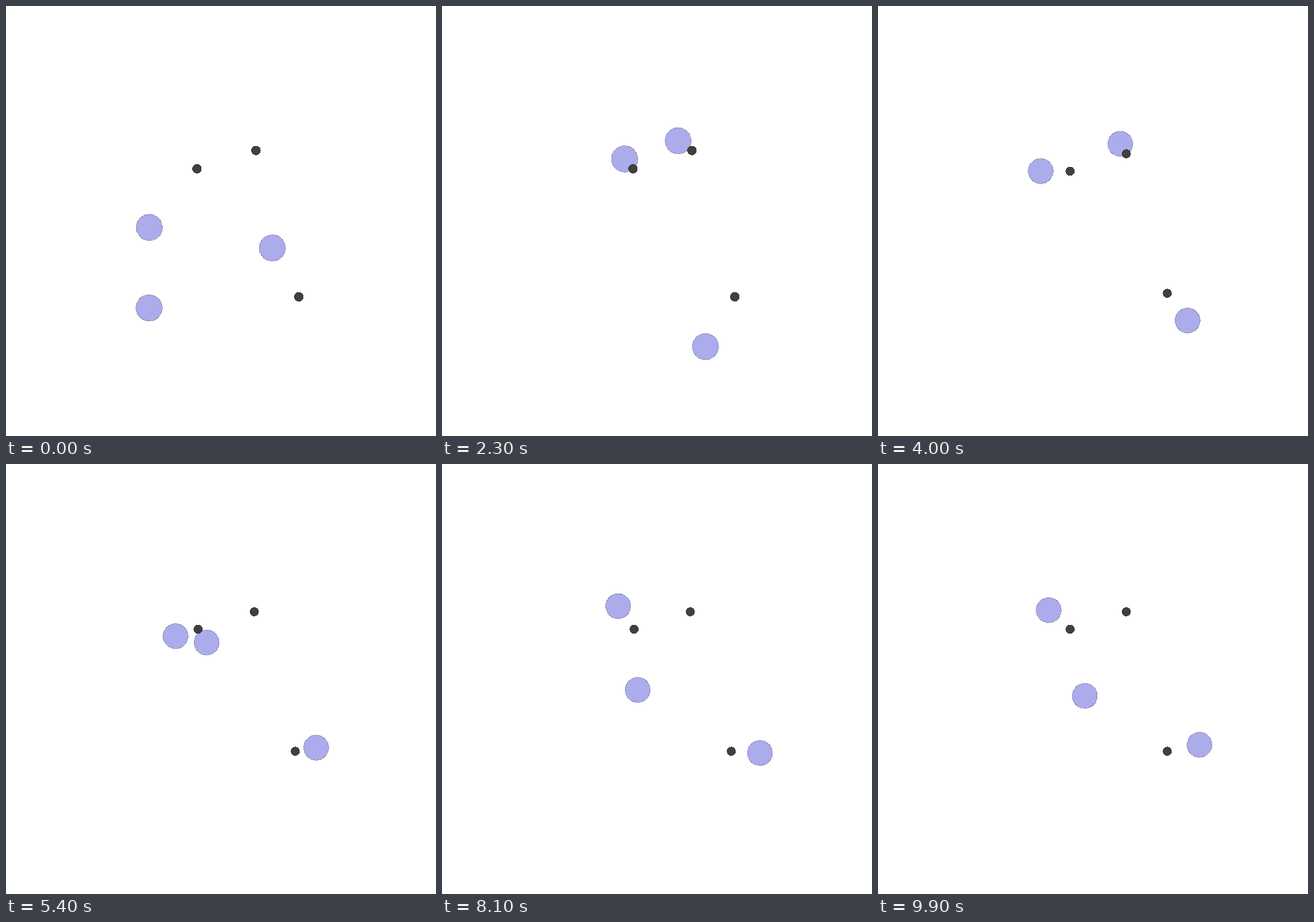
An HTML page for the animation above (10000 ms loop, 700x700 px).

```html
<!DOCTYPE html>
<html lang="en">
<head>
<meta charset="utf-8">
<title>Agents and landmarks</title>
<style>
  html, body { margin: 0; width: 100%; height: 100%; overflow: hidden; background: #fff; }
  svg { display: block; width: 100vw; height: 100vh; }
  circle { shape-rendering: crispEdges; stroke-width: 1; vector-effect: non-scaling-stroke; }
  .agent { fill: #acacec; stroke: #75759f; stroke-dasharray: 2 1; }
  .landmark { fill: #404040; stroke: #383838; }
</style>
</head>
<body>
<svg viewBox="0 0 700 700"><g id="world"></g></svg>
<script>
const LOOP = 10, STEP = 0.1, CENTER = 350;
const ZOOM_TIME = 2.8, ZOOM_OUT = 0.9535;
const AGENT_RADIUS = 21.3, LANDMARK_RADIUS = 7.2;
const world = document.getElementById('world');

// Key moments in seconds, shared by all agents.
const times = [0, 1.1, 2.3, 3.3, 4, 4.8, 5.4, 6.9, 8.1, 9.9];

// Screen position of each agent at those moments.
const paths = [
  { x: [233.4, 290, 297.3, 249, 264.9, 273, 276, 273, 286.7, 277.9],
    y: [360.4, 266, 249, 258, 268.8, 279, 280.2, 267.4, 231.4, 238] },
  { x: [433.5, 441, 384.5, 387, 394.5, 357, 326.6, 335, 318.6, 336.7],
    y: [393.8, 264, 219.4, 220, 224.5, 256, 290.7, 338.8, 367.8, 377.5] },
  { x: [233, 325, 428.8, 470, 504, 544, 504.9, 514, 517.6, 523.3],
    y: [491.5, 521, 554.5, 553.5, 512, 484, 461.8, 464.8, 470.6, 457] }
];

const landmarks = [[310.9, 265], [406.9, 235.2], [476.7, 473.4]];

const zoomAt = t => t < ZOOM_TIME ? 1 : ZOOM_OUT;

function addCircle(className, r) {
  const circle = document.createElementNS('http://www.w3.org/2000/svg', 'circle');
  circle.setAttribute('class', className);
  circle.setAttribute('r', r);
  return world.appendChild(circle);
}

function moveTo(circle, x, y) {
  circle.setAttribute('cx', x);
  circle.setAttribute('cy', y);
}

function slope(values, i) {
  const a = Math.max(i - 1, 0), b = Math.min(i + 1, times.length - 1);
  return (values[b] - values[a]) / (times[b] - times[a]);
}

// Smooth cubic curve through the key values.
function valueAt(values, t) {
  let i = 0;
  while (i < times.length - 2 && t >= times[i + 1]) i++;
  const span = times[i + 1] - times[i], u = (t - times[i]) / span, v = 1 - u;
  return v * v * (1 + 2 * u) * values[i] + u * u * (3 - 2 * u) * values[i + 1]
    + span * u * v * (v * slope(values, i) - u * slope(values, i + 1));
}

const toWorld = values =>
  values.map((value, i) => CENTER + (value - CENTER) / zoomAt(times[i]));

const agents = paths.map(({ x, y }) =>
  ({ circle: addCircle('agent', AGENT_RADIUS), x: toWorld(x), y: toWorld(y) }));
landmarks.forEach(([x, y]) => moveTo(addCircle('landmark', LANDMARK_RADIUS), x, y));

function draw(seconds) {
  const t = Math.floor((seconds % LOOP) / STEP + 1e-6) * STEP;
  for (const { circle, x, y } of agents) moveTo(circle, valueAt(x, t), valueAt(y, t));
  world.setAttribute('transform',
    `translate(${CENTER} ${CENTER}) scale(${zoomAt(t)}) translate(${-CENTER} ${-CENTER})`);
}

const start = performance.now();
function tick() {
  draw((performance.now() - start) / 1000);
  requestAnimationFrame(tick);
}
tick();
</script>
</body>
</html>
```
